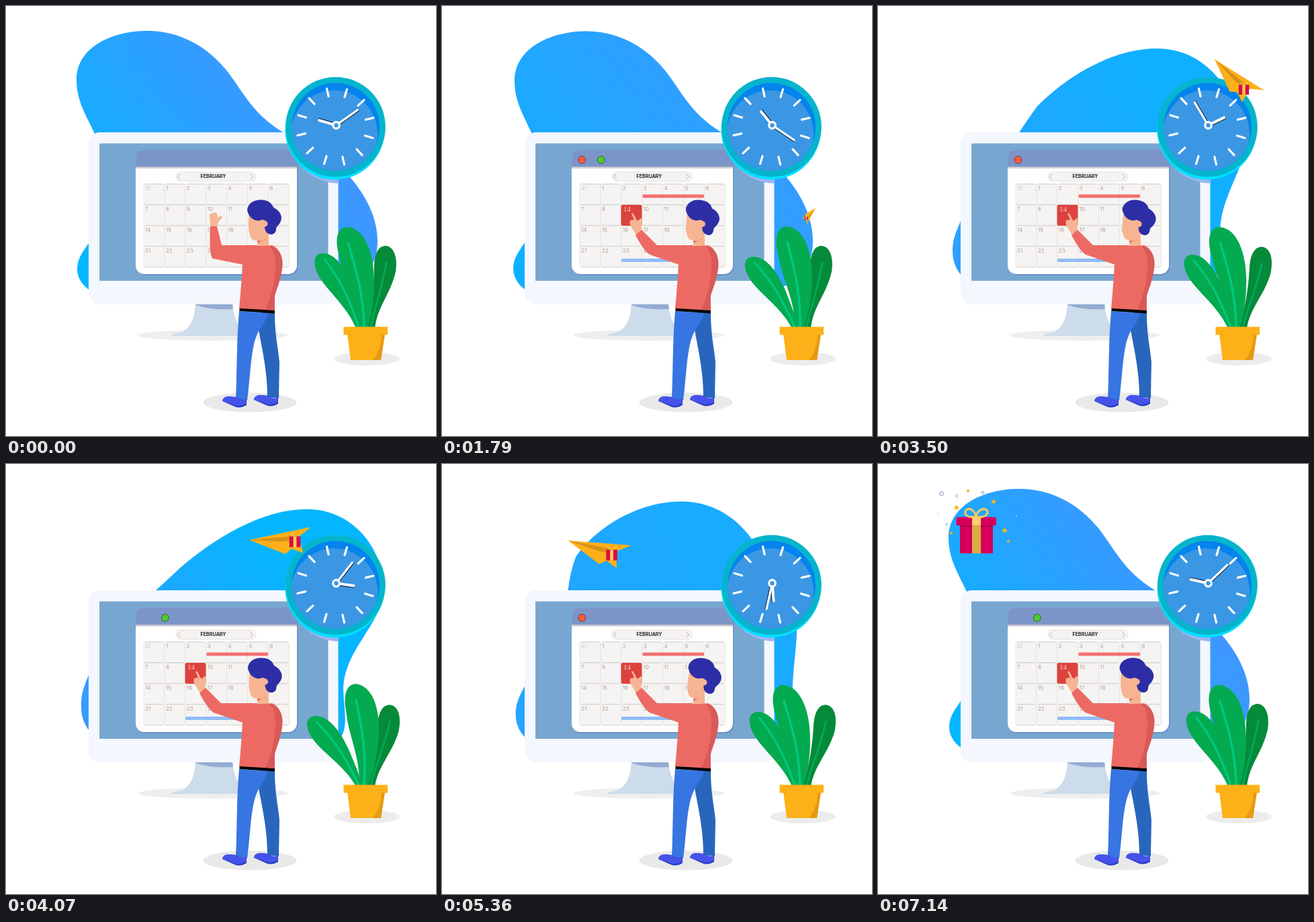
Recreate the animation shown at these times as an HTML page. Size 640 by 640 pixels, loop 7210 ms.

```html
<!DOCTYPE html>
<html lang="en">
<head>
<meta charset="utf-8">
<title>Calendar planning</title>
<style>
  html, body { margin: 0; width: 100%; height: 100%; overflow: hidden; background: #fff; }
  svg { display: block; width: 100vw; height: 100vh; }
  text { font-family: Inter, "Open Sans", sans-serif; }
</style>
</head>
<body>
<svg viewBox="0 0 640 640">
  <defs>
    <linearGradient id="blobFill" gradientUnits="userSpaceOnUse" x1="100" y1="400" x2="440" y2="160">
      <stop id="stopA"/><stop id="stopB" offset="1"/>
    </linearGradient>
    <clipPath id="faceClip"><circle cx="490.5" cy="180" r="65.5"/></clipPath>
    <clipPath id="monitorClip"><rect x="123" y="188" width="371.500" height="256"/></clipPath>
  </defs>

  <path id="blob" fill="url(#blobFill)"/>

  <!-- monitor -->
  <ellipse cx="308" cy="490" rx="112" ry="8" fill="#eee"/>
  <path d="M282 440C281 470 272 486 250 488Q245 491 247 491H373Q375 489 368 488C348 484 339 470 337 440Z" fill="#cddcea"/>
  <path d="M282 444H337L338 451Q305 453 282 445Z" fill="#94abd3"/>
  <rect x="123" y="188" width="371.500" height="256" rx="17" fill="#f4f7fd"/>
  <rect x="139" y="204.500" width="340.500" height="204.500" fill="#77a7d0"/>
  <rect x="195" y="215" width="239.500" height="186" rx="13" fill="#6d8fc9"/>
  <rect x="193" y="214" width="240" height="185" rx="13" fill="#fff"/>
  <path d="M193 240V227Q193 214 206 214H420Q433 214 433 227V240Z" fill="#7c95c8"/>
  <path d="M193 240.500H433" stroke="#d3cdd3" stroke-width="2.500"/>
  <g stroke="#222" stroke-width=".6">
    <circle id="redLight" cx="208.300" cy="229" r="5.500" fill="#fb593c"/>
    <circle id="greenLight" cx="236.800" cy="229" r="5.500" fill="#4ccb34"/>
  </g>
  <rect x="253" y="247" width="119" height="14" rx="7" fill="#f4f3f1" stroke="#e6e1df"/>
  <path d="M259.500 250L255.500 254L259.500 258M363.500 250L367.500 254L363.500 258" fill="none" stroke="#c3a59f"/>
  <text x="308.500" y="256" text-anchor="middle" font-size="7.200" font-weight="600" fill="#111">FEBRUARY</text>
  <g id="days" font-size="8"></g>
  <g id="events">
    <rect x="266.500" y="296" width="31" height="31" rx="2" fill="#dc423e"/>
    <text x="270" y="306" style="font-family:'Liberation Serif',serif" font-size="11" fill="#f7cfca">14</text>
    <rect id="redBar" x="298.500" y="280.500" height="5" rx="1.500" fill="#f56f6f"/>
    <rect id="blueBar" x="267" y="376" height="5" rx="1.500" fill="#8fbcf8"/>
  </g>

  <!-- clock -->
  <circle cx="495" cy="190" r="74" fill="#9ab5f3" clip-path="url(#monitorClip)"/>
  <circle cx="489.500" cy="184.500" r="74" fill="#00dfff"/>
  <circle cx="490.500" cy="180" r="74.300" fill="#06b4cd"/>
  <circle cx="490.500" cy="180" r="65.500" fill="#0583ee"/>
  <circle cx="488.500" cy="190" r="64.500" fill="#3b97e4" clip-path="url(#faceClip)"/>
  <g id="ticks" stroke="#fff" stroke-width="3.200" stroke-linecap="round"></g>
  <g id="hourHand"><path d="M1.200 0V-28" stroke="#10233c" stroke-width="4"/><path d="M0 0V-28" stroke="#fff" stroke-width="4"/></g>
  <g id="minuteHand"><path d="M1.200 0V-40.500" stroke="#10233c" stroke-width="3"/><path d="M0 0V-40.500" stroke="#fff" stroke-width="3.200"/></g>
  <circle cx="491.500" cy="177.500" r="4.800" fill="#3b97e4" stroke="#fff" stroke-width="3.200"/>

  <!-- plant -->
  <ellipse cx="537" cy="525" rx="49" ry="10" fill="#ececec"/>
  <g fill="none" stroke="#00c97d" stroke-width="3.500" stroke-linecap="round">
    <g id="leafRight">
      <path d="M537 480C545 450 548 420 548 390C548 365 556 357 565 357C578 358 583 375 580 395C573 428 552 448 549 480Z" fill="#048a38" stroke="none"/>
      <path d="M566 382C560 420 548 450 543 478" stroke="#00a75a" stroke-width="3"/>
    </g>
    <g id="leafLeft">
      <path d="M521 480C507 447 484 430 468 406C455 385 457 368 472 368C492 368 508 395 517 425C524 450 529 465 529 480Z" fill="#04aa50" stroke="none"/>
      <path d="M474 377C500 410 512 440 525 478" stroke-width="3"/>
    </g>
    <g id="leafMid">
      <path d="M526 480C523 435 504 410 496 372C488 345 494 329 508 329C535 331 548 370 548 410C548 440 543 465 538 480Z" fill="#04aa50" stroke="none"/>
      <path d="M509 353C522 395 532 430 533 478"/>
    </g>
  </g>
  <path d="M508 488L513 527H558L564 488Z" fill="#feb018"/>
  <path d="M564 488L558 527H546C556 515 559 500 559 488Z" fill="#e39a14"/>
  <rect x="502.500" y="477.500" width="65.500" height="12" fill="#feb018"/>

  <!-- person -->
  <ellipse cx="363" cy="590" rx="69.500" ry="14.500" fill="#e9e9e9"/>
  <path d="M380 455H400C400 490 405 508 407 530L406 584L389 582C389 545 382 515 376 482Z" fill="#2866bd"/>
  <path d="M347 454L390 457C388 470 379 476 374 488C364 510 364 550 359 587L342 585C344 540 343 500 347 454Z" fill="#3775e2"/>
  <g id="shoe">
    <path d="M322 588Q323 581 332 581L342 582Q351 588 358 585V594Q348 600 340 596Z" fill="#2b3cc6"/>
    <path d="M322 588Q323 581 332 581L342 582Q351 588 358 585L357 592Q346 598 338 593Z" fill="#4653ea"/>
  </g>
  <use href="#shoe" x="47" y="-2"/>
  <path d="M347.500 449L400 451V457.500L347.500 454Z" fill="#000"/>
  <path d="M374 336H391V358Q382 361 374 356Z" fill="#f6b492"/>
  <path d="M374 349Q382 351 388 346L374 353Z" fill="#ea6a63"/>
  <path d="M353 356Q382 358 396 356C408 361 412 375 411 388C410 405 402 422 400 431V453L347 450C349 430 351 405 352 383Z" fill="#ec6a63"/>
  <path d="M391 357C411 359 413 380 411 391C408 412 402 423 400 431V453L386 452C399 425 401 400 401 380C400 368 397 361 391 357Z" fill="#d85a59"/>
  <path id="openHand" fill="#f6b492" d="M305 329Q303 320 303 312Q304 308 308 308L313 307Q316 312 314 316Q319 312 322 313Q322 316 316 321L314 329Z"/>
  <path id="pointHand" fill="#f6b492" d="M282 309Q284 307 286 311L290 319Q293 320 294 317Q296 315 298 317Q297 328 296 334L289 341L283 331Q278 325 280 319L286 318Z"/>
  <path id="arm" fill="#ec6a63"/>
  <g id="head">
    <path d="M362 304C360 325 360 340 366 347C373 352 385 348 387 338L389 312Z" fill="#f6b492"/>
    <path d="M359 304C360 292 372 287 384 289C391 290 396 294 398 300C408 304 412 314 409 320C407 326 402 328 402 332C402 340 394 342 389 338C384 334 385 328 385 319L381 318C374 322 362 318 359 304Z" fill="#2d2ea6"/>
    <circle cx="385" cy="324" r="4.500" fill="#f6b492"/>
  </g>

  <!-- paper plane, nose at the origin, with an upright parcel -->
  <g id="plane">
    <path d="M0 0L94 7L72 16V41L57 30L46 35Z" fill="#fdb019"/>
    <path d="M0 0L73 14L72 19L46 16Z" fill="#d99218"/>
    <g id="parcel">
      <path d="M-8.500 -8H-2.500V8H-8.500ZM2 -8H8V8H2Z" fill="#da0d42"/>
      <path d="M-2.500 -8H2V8H-2.500Z" fill="#f9c95a"/>
      <path d="M0 -9Q-8 -14 -4 -8M0 -9Q8 -14 4 -8" fill="none" stroke="#f9c95a"/>
    </g>
  </g>

  <!-- present -->
  <rect id="giftBody" x="-24.500" y="-21" width="49" height="42" rx="1.500" fill="#d6005c"/>
  <g id="giftTrim">
    <path d="M122 90H171V94H122Z" fill="#b4004d"/>
    <path d="M140 91H153V133H140Z" fill="#dcae45"/>
    <rect x="116.500" y="79" width="59.500" height="12.500" rx="2" fill="#d6005c"/>
    <path d="M140 79H153V91.500H140Z" fill="#fbd06a"/>
    <path d="M146 78C132 82 126 72 132 68C139 64 145 72 146 78C147 72 154 64 161 68C167 72 160 82 146 78" fill="none" stroke="#f9c95a" stroke-width="3"/>
  </g>
  <g id="confetti"></g>
</svg>

<script>
const LOOP = 7210, START = 1210;
const $ = id => document.getElementById(id);
const set = (id, name, value) => $(id).setAttribute(name, value);
const lerp = (a, b, k) => a + (b - a) * k;
const mixList = (a, b, k) => a.map((v, i) => lerp(v, b[i], k));
const span = (t, from, to) => Math.min(1, Math.max(0, (t - from) / (to - from)));
const cubic = x => x < .5 ? 4 * x ** 3 : 1 - 4 * (1 - x) ** 3;
const smooth = x => x * x * (3 - 2 * x);
const show = (id, on) => set(id, 'opacity', +on);

// Blob outlines: a start point followed by cubic segments
const blobLeft = [105,110, 105,60,160,37,210,37, 265,37,305,66,330,98, 358,135,372,172,440,202,
  500,228,553,290,553,350, 553,410,500,430,440,430, 350,430,200,440,150,432,
  120,428,106,408,106,392, 106,365,130,355,138,320, 150,270,150,225,131,188, 118,160,105,140,105,110];
const blobRight = [262,156, 315,112,385,68,453,68, 490,68,520,85,540,110, 555,130,566,155,566,180,
  566,235,501,275,501,335, 501,375,525,430,440,425, 350,425,200,425,150,415,
  125,405,112,385,112,360, 112,335,119,325,128,300, 140,265,190,215,225,188, 238,177,250,167,262,156];
const cyan = [0, 184, 255], blue = [63, 150, 255];
const rgb = c => `rgb(${c.map(Math.round)})`;

// Arm corners: inner elbow, wrist right, wrist left, elbow bend, elbow
const armRaised = [321,356, 314,328, 304,328, 302,374, 308,376];
const armPointing = [320,356, 297,333, 288,341, 300,364, 309,370];

// Plane: time, nose x, nose y, turn, scale
const flight = [[0,510,490,112,.06], [580,556,301,114,.3], [1720,602,71,72,.85], [2000,572,62,50,.88],
  [2860,362,113,-16,1], [3580,253,127,0,1], [4720,123,101,0,1], [6000,20,80,0,1]];

// Confetti: kind, x, y, size, colour
const pieces = [['ring',94.5,44,2.8,'#8b86b5'], ['ring',117,47.5,1.8,'#7cc4f5'], ['dot',134,40,2,'#fbb21c'],
  ['ring',156,42.5,1.8,'#8b86b5'], ['star',172,56,4.5,'#fbb21c'], ['star',117,65,4.5,'#fbb21c'],
  ['star',188.5,99,4.8,'#fbb21c'], ['star',109,103,3,'#fbb21c'], ['dot',90,74,1,'#fbd06a'],
  ['ring',102,90,1.3,'#7cc4f5'], ['dot',194,115,2,'#fbb21c'], ['dot',191,40,.8,'#54c47c'], ['dot',206,77,1,'#9fd8ff']];

function starPoints(r) {
  return Array.from({length: 10}, (_, i) => {
    const a = i * Math.PI / 5 + .2, d = i % 2 ? r * .45 : r;
    return [d * Math.sin(a), -d * Math.cos(a)];
  }).join(' ');
}

function buildStatic() {
  let days = '';
  for (let row = 0; row < 4; row++) for (let col = 0; col < 7; col++) {
    const n = row * 7 + col, x = 205 + col * 30.9, y = 265 + row * 30.9;
    days += `<rect x="${x}" y="${y}" width="30.9" height="30.9" rx="2.5" fill="#f5f4f2" stroke="#e6e4e2"/>
      <path d="M${x + 2} ${y}h27M${x + 2} ${y + 30.9}h27" stroke="#d3d1d0"/>
      <text x="${x + 2}" y="${y + 9.3}" fill="${n ? '#b39c98' : '#cfc4c1'}">${n || 31}</text>`;
  }
  $('days').innerHTML = days;
  $('ticks').innerHTML = Array.from({length: 12}, (_, i) =>
    `<path d="M0 -46V-58" transform="translate(490.5 179.5) rotate(${17 + 30 * i})"/>`).join('');
  $('confetti').innerHTML = pieces.map(([kind, , , r, color]) => kind === 'star'
    ? `<polygon points="${starPoints(r)}" fill="${color}"/>`
    : `<circle r="${r}" ${kind === 'ring' ? `fill="none" stroke="${color}"` : `fill="${color}"`}/>`).join('');
}

function drawBlob(u) {
  const k = Math.min(cubic(span(u, 0, 3470)), 1 - cubic(span(u, 2812, 5700)));
  const [x, y, ...rest] = mixList(blobLeft, blobRight, k);
  set('blob', 'd', `M${x} ${y}C${rest.join(' ')}Z`);
  const tint = 1 - Math.abs(1 - u / 3000);
  set('stopA', 'stop-color', rgb(mixList(cyan, blue, tint)));
  set('stopB', 'stop-color', rgb(mixList(blue, cyan, tint)));
}

function drawArm(t) {
  const reach = smooth(span(t, 800, START));
  const wave = t < 800 ? -8 * Math.sin(Math.PI * t / 400) ** 2 : 0;
  const p = mixList(armRaised, armPointing, reach);
  p[2] += wave;
  p[4] += wave;
  set('arm', 'd', `M374 356L${p.slice(0, 6)}Q${p.slice(6)}L353 385Z`);
  const midX = (p[2] + p[4]) / 2, midY = (p[3] + p[5]) / 2;
  set('openHand', 'transform', `translate(${midX - 309} ${midY - 328})`);
  set('pointHand', 'transform', `translate(${midX - 292.5} ${midY - 337})`);
  show('openHand', reach < .5);
  show('pointHand', reach >= .5);
}

function drawPlane(u) {
  const i = Math.max(1, flight.findIndex(f => f[0] >= u));
  const a = flight[i - 1], b = flight[i];
  const [, x, y, turn, scale] = mixList(a, b, span(u, a[0], b[0]));
  set('plane', 'transform', `translate(${x} ${y}) rotate(${turn}) scale(${scale})`);
  set('parcel', 'transform', `translate(65 21.5) rotate(${-turn})`);
  set('plane', 'opacity', u > 0 ? 1 - span(u, 4400, 4900) : 0);
}

function drawGift(u) {
  const grow = smooth(span(u, 4720, 5200));
  const [x, y, turn, sx, sy] = mixList([144, 103, -6, .75, .58], [146.5, 112, 0, 1, 1], grow);
  set('giftBody', 'transform', `translate(${x} ${y}) rotate(${turn}) scale(${sx} ${sy})`);
  set('giftBody', 'opacity', span(u, 4500, 4900));
  set('giftTrim', 'opacity', span(u, 5000, 5250));
  const burst = 1 - (1 - span(u, 5200, 5930)) ** 2;
  show('confetti', u > 5200);
  pieces.forEach(([, px, py], i) => $('confetti').children[i].setAttribute('transform',
    `translate(${lerp(146, px, burst)} ${lerp(80, py, burst)}) scale(${burst})`));
}

function drawSway(u) {
  const s = Math.abs(Math.sin(Math.PI * u / 2000));
  set('leafLeft', 'transform', `rotate(${-7.2 * s ** 1.4} 525 478)`);
  set('leafMid', 'transform', `rotate(${6 * s ** 4} 532 478)`);
  const lean = smooth(span(u, 580, 1500)) * (1 - smooth(span(u, 4700, 5930)));
  set('leafRight', 'transform', `rotate(${3.2 * lean} 543 478)`);
  const nod = 1 - Math.abs(1 - u % 3000 / 1500);
  set('head', 'transform', `rotate(${9 * nod} 380 366)`);
}

function render(t) {
  const u = Math.max(0, t - START), active = t >= START;
  drawBlob(u);
  drawArm(t);
  drawPlane(u);
  drawGift(u);
  drawSway(u);
  set('hourHand', 'transform', `translate(491.5 177.5) rotate(${286.5 + u * .06})`);
  set('minuteHand', 'transform', `translate(491.5 177.5) rotate(${54.5 + u * .12})`);
  const beat = Math.floor(u / 1200);
  show('redLight', active && (beat === 0 || beat % 2 === 1));
  show('greenLight', active && beat % 2 === 0);
  show('events', active);
  const bar = span(u, 0, 300);
  set('redBar', 'width', 91.5 * bar);
  set('blueBar', 'width', 91.5 * bar);
}

buildStatic();
const began = performance.now();
function tick() {
  render((performance.now() - began) % LOOP);
  requestAnimationFrame(tick);
}
tick();
</script>
</body>
</html>
```
